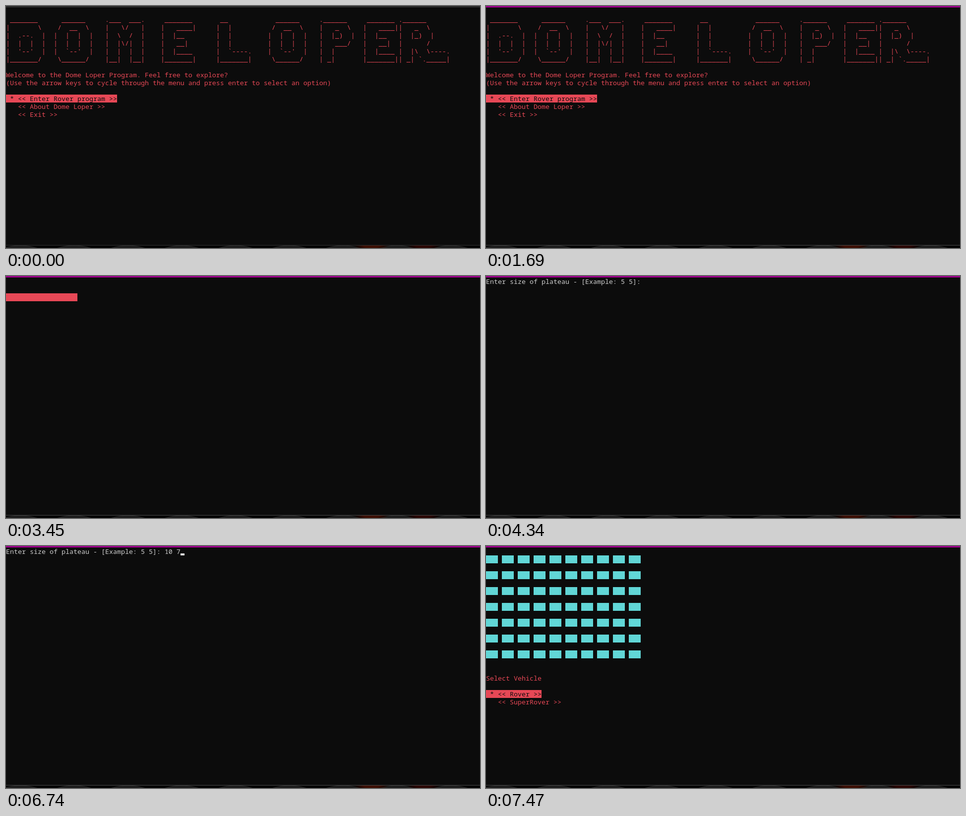
These frames come from a looping animation (956x489 px, 8 s). An HTML page:

```html
<!DOCTYPE html>
<html lang="en">
<head>
<meta charset="utf-8">
<title>Console menu</title>
<style>
  :root { --bg: #0c0c0c; --red: #e74856; --cyan: #61d6d6; }
  html, body { margin: 0; width: 100%; height: 100%; overflow: hidden; background: var(--bg); }
  #stage { position: relative; width: 956px; height: 489px; overflow: hidden; background: var(--bg); }
  #stage > * { position: absolute; }
  pre {
    left: 0; top: 3px; margin: 0; visibility: hidden; color: var(--red);
    font: 13.3333px/16px "Noto Sans Mono", "DejaVu Sans Mono", monospace;
    font-variant-ligatures: none;
  }
  pre.on { visibility: visible; }
  b, u { display: inline-block; height: 16px; font-weight: inherit; text-decoration: none; vertical-align: top; }
  b { background: var(--red); color: var(--bg); }
  u { background: var(--cyan); }
  .wiped, .wiped b { color: transparent; }
  #prompt { color: #ccc; }
  #top { left: 0; top: 0; width: 956px; height: 3px; background: #2b2b2b; }
  #edge { left: 0; top: 483px; width: 956px; height: 1px; background: #343434; }
  .focus #top { background: #9a0089; }
  .focus #edge { background: #4c4c4c; }
  #desk {
    left: 0; top: 484px; width: 956px; height: 5px;
    background:
      radial-gradient(ellipse 34px 9px at 737px 1px, #3c0e02 45%, transparent) no-repeat,
      radial-gradient(ellipse 32px 9px at 842px 1px, #2a0603 45%, transparent) no-repeat,
      radial-gradient(circle 110px at 54px 109px, #1b1b1b 107px, #262626 109px, transparent 110px) -25px 0 / 108.5px 5px,
      #030303;
  }
  #caret { width: 8px; height: 4px; background: #f2f2f2; }
  #pointer { left: 0; top: 0; width: 13px; height: 20px; overflow: visible; }
</style>
</head>
<body>
<div id="stage">
<pre id="home">

 _______      ______     .___  ___.     _______       __            ______     .______     _______ .______
|       \    /  __  \    |   \/   |    |   ____|     |  |          /  __  \    |   _  \   |   ____||   _  \
|  .--.  |  |  |  |  |   |  \  /  |    |  |__        |  |         |  |  |  |   |  |_)  |  |  |__   |  |_)  |
|  |  |  |  |  |  |  |   |  |\/|  |    |   __|       |  |         |  |  |  |   |   ___/   |   __|  |      /
|  '--'  |  |  `--'  |   |  |  |  |    |  |____      |  `----.    |  `--'  |   |  |       |  |____ |  |\  \----.
|_______/    \______/    |__|  |__|    |_______|     |_______|     \______/    | _|       |_______|| _| `._____|

Welcome to the Dome Loper Program. Feel free to explore?
(Use the arrow keys to cycle through the menu and press enter to select an option)

<b> * &lt;&lt; Enter Rover program &gt;&gt;</b>
   &lt;&lt; About Dome Loper &gt;&gt;
   &lt;&lt; Exit &gt;&gt;</pre>
<pre id="shape">Select Plateau

<b> * &lt;&lt; Rectangle &gt;&gt;</b></pre>
<pre id="prompt">Enter size of plateau - [Example: 5 5]: <span id="typed"></span></pre>
<pre id="grid"></pre>
<pre id="vehicle" style="top:259px">Select Vehicle

<b> * &lt;&lt; Rover &gt;&gt;</b>
   &lt;&lt; SuperRover &gt;&gt;</pre>
<div id="caret"></div>
<div id="top"></div>
<div id="edge"></div>
<div id="desk"></div>
<svg id="pointer" viewBox="0 0 13 20">
  <path d="M.5 .5V16.5L4.2 13L6.8 18.7L9.2 17.6L6.7 12H11.8Z" fill="#fff" stroke="#000" stroke-width=".9"/>
</svg>
</div>
<script>
const LOOP = 8000, CELL_W = 8, CELL_H = 16, TOP = 3;
const $ = id => document.getElementById(id);
const pages = [...document.querySelectorAll('pre')];

// Each entry holds from its time until the next one.
const screens = [
  [0, 'home'], [2420, 'home', true], [2490, 'shape'], [3450, 'shape', true],
  [3520, ''], [3590, 'prompt'], [6870, 'grid'], [6940, 'grid vehicle']
];
const typing = [[0, ''], [4940, '1'], [5140, '10'], [5340, '10 '], [5940, '10 7']];
const tiles = [[0, 38], [6940, 70]];
// time, column, row; no position means the caret is hidden
const caret = [
  [0], [1160, 0, 14], [1690], [2220, 0, 14], [2420], [2490, 0, 3], [3250],
  [3590, 40, 0], [4340], [4870, 40, 0], [4940, 41, 0], [5140, 42, 0], [5340],
  [5670, 43, 0], [5870], [5940, 44, 0], [6410], [6740, 44, 0],
  [6870, 32, 7], [6940, 0, 20], [7470]
];

const at = (list, t) => list.findLast(e => e[0] <= t).slice(1);

function tileText(count) {
  let s = '\n';
  for (let i = 1; i <= count; i++) s += '<u>   </u>' + (i % 10 ? ' ' : '\n\n');
  return s;
}

function pointerAt(t) {
  if (t < 130 || t >= 1430) return null;
  if (t < 960) {
    const u = Math.min(10, Math.floor((t - 130) / 76)) / 10;
    const k = 1 - (1 - u) ** 2;
    return [889 - 821 * k, 472 - 282 * k];
  }
  if (t < 1020) return [67, 188];
  if (t < 1230) return [66, 186];
  const step = Math.floor((t - 1230) / 67) + 1;
  return [66 - 22 * step, 186 - 3 * step];
}

function place(el, pos) {
  el.style.display = pos ? 'block' : 'none';
  if (pos) el.style.transform = `translate(${Math.round(pos[0])}px, ${Math.round(pos[1])}px)`;
}

let shownTiles = 0;
function render(t) {
  const [names, wiped] = at(screens, t);
  for (const p of pages) {
    p.classList.toggle('on', names.split(' ').includes(p.id));
    p.classList.toggle('wiped', !!wiped);
  }
  $('typed').textContent = at(typing, t)[0];

  const [count] = at(tiles, t);
  if (count !== shownTiles) {
    $('grid').innerHTML = tileText(count);
    shownTiles = count;
  }

  const [col, row] = at(caret, t);
  place($('caret'), col === undefined ? null : [col * CELL_W, TOP + row * CELL_H + 12]);
  place($('pointer'), pointerAt(t));
  $('stage').classList.toggle('focus', t >= 1160);
}

const start = performance.now();
function tick() {
  render((performance.now() - start) % LOOP);
  requestAnimationFrame(tick);
}
tick();
</script>
</body>
</html>
```
